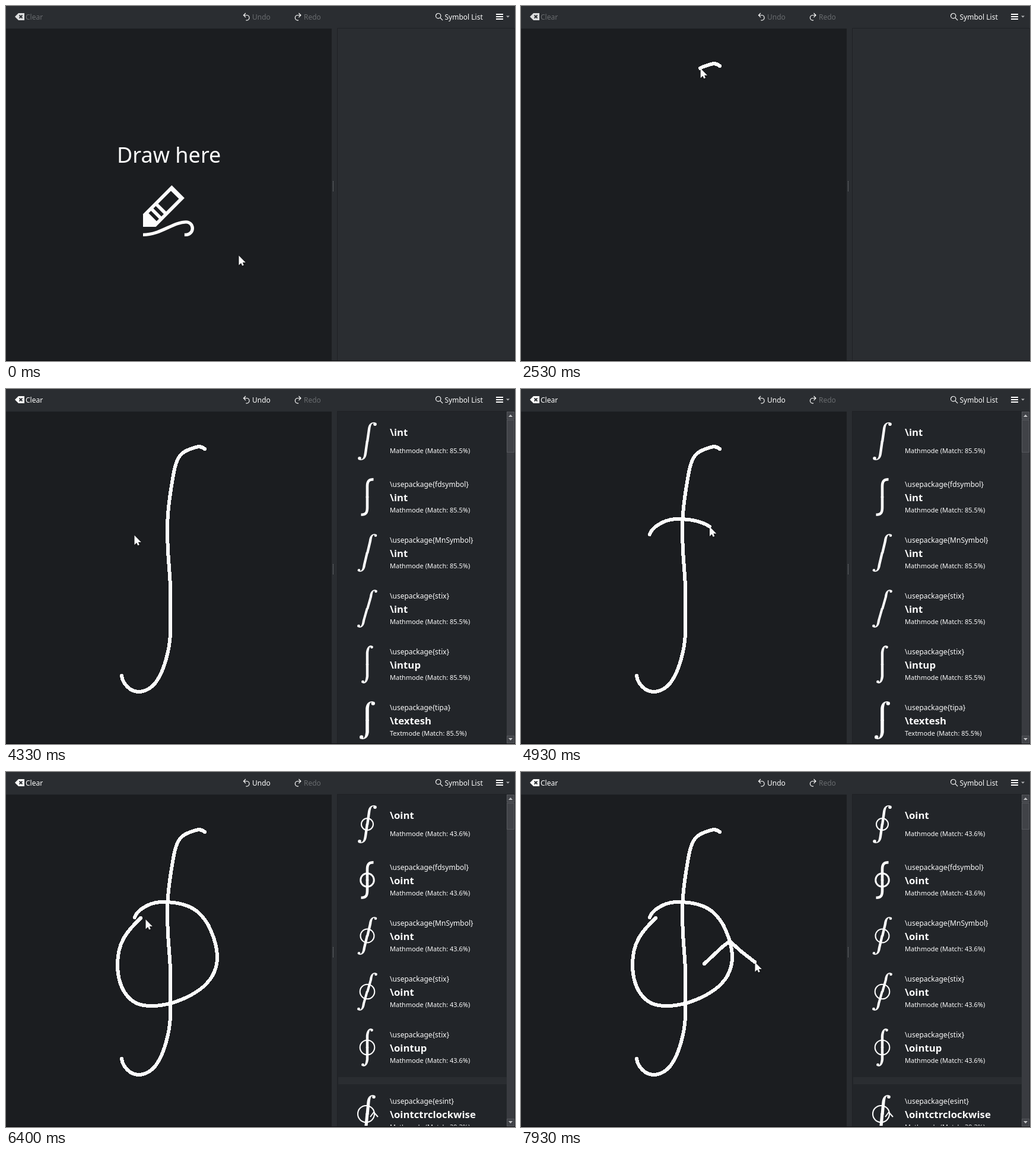
An HTML page for the animation above (8 s loop, 858 by 598 pixels).

```html
<!DOCTYPE html>
<html lang="en">
<head>
<meta charset="utf-8">
<title>Symbol drawing</title>
<style>
  html, body { margin: 0; width: 100%; height: 100%; overflow: hidden; background: #2a2d31; }
  svg { display: block; width: 858px; height: 598px; font: 12px "Noto Sans", sans-serif; fill: #fcfcfc; }
  .line { fill: none; stroke: #fcfcfc; }
  .ink { stroke-width: 6; stroke-linecap: round; stroke-linejoin: round; shape-rendering: crispEdges; }
  .cmd { font-size: 16.8px; font-weight: 700; }
  .match { font-size: 11px; }
  .dim { fill: #686b6e; }
</style>
</head>
<body>
<svg viewBox="0 0 858 598">
  <defs><clipPath id="view"><rect x="559" y="38" width="285" height="558"/></clipPath></defs>
  <rect width="858" height="598" fill="#2a2d31"/>
  <rect y="38" width="549" height="560" fill="#1b1d20"/>
  <path d="M558.5 598V37.5H857.5V598" fill="none" stroke="#1f2125"/>
  <path d="M551.5 295V312" fill="none" stroke="#8a8c8f" stroke-dasharray="1 1"/>

  <path id="clearIcon" d="M15 18L21 12H31V24H21Z"/>
  <path d="M22.5 15.5l5 5m0-5l-5 5" stroke="#2a2d31" stroke-width="1.8"/>
  <text id="clear" x="33" y="23">Clear</text>
  <path id="undoIcon" class="line" stroke-width="1.2" d="M404 12l-3.5 3.5 3.5 3.5M400.5 15.5h5.3a4.3 4.3 0 0 1 0 8.6h-1.3"/>
  <text id="undo" x="415" y="23">Undo</text>
  <use href="#undoIcon" transform="translate(897.5) scale(-1 1)"/>
  <text class="dim" x="502" y="23">Redo</text>
  <g class="line" stroke-width="1.2"><circle cx="728.7" cy="16.7" r="4.2"/><path d="M731.7 19.7l4.5 4.5"/></g>
  <text x="739.5" y="23">Symbol List</text>
  <path d="M826 13h12v2h-12zm0 4h12v2h-12zm0 4h12v2h-12z"/>
  <path d="M843 16.5h6l-3 3z" fill="#b0b2b4"/>

  <g id="hint">
    <text x="274.7" y="264" font-size="36" text-anchor="middle">Draw here</text>
    <g transform="translate(231 302) scale(5.375)">
      <path d="M9 0L13 4 4 13H0V9Z"/>
      <path id="slots" fill="#1b1d20"/>
      <path class="line" d="M0 15.5C5.5 15.5 9.5 11.5 13.5 11.5A2 2 0 0 1 13.5 15.5H13"/>
    </g>
  </g>

  <g id="list">
    <rect x="559" y="38" width="285" height="559" fill="#222529"/>
    <g id="plain" clip-path="url(#view)"></g>
    <g id="ring" clip-path="url(#view)"></g>
    <rect x="844" y="38" width="13" height="559" fill="#393b40"/>
    <g fill="#414348" stroke="#56585d">
      <rect x="844.5" y="38.5" width="12" height="12"/>
      <rect x="844.5" y="584.5" width="12" height="12"/>
      <rect id="thumb" x="844.5" y="52.5" width="12"/>
    </g>
    <path d="M847 47h7l-3.5-4zM847 588h7l-3.5 4z" fill="#c4c5c7"/>
  </g>
  <rect y="597" width="858" height="1" fill="#0c0c0e"/>

  <path id="stem" class="line ink" d="M335 101C328 95 322 97 311 101C296 106 288 113 283 140
    C277 172 272 205 272 235C272 290 277 305 277 340V413C276 435 268 475 251 496C238 511 222 513 210 506C202 501 196 492 195 483"/>
  <path id="loop" class="line ink" d="M217 245C220 234 240 219 264 219C310 219 328 235 341 258C350 276 356 296 356 312
    C356 350 325 374 283 388C263 394 245 394.5 236 393.5C203 391 188 358 188 325C188 288 202 270 227 246"/>
  <path id="head" class="line ink" d="M309 323L340 294 352 285 372 303 394 320"/>
  <path id="cursor" d="M.5 .5V16.5L4.2 13 6.2 17.5 8.8 16.4 6.9 12H11.8Z" style="filter:drop-shadow(0 1px 1.5px rgba(0,0,0,.6))"/>
</svg>
<script>
const $ = id => document.getElementById(id);
const LOOP = 8000, RATE = 15;

// Dark slots across the pencil: start and end measured down its length.
$('slots').setAttribute('d', [[1, 5], [5.75, 6.5], [7.25, 8]].map(([a, b]) => {
  const corner = (p, d) => `${9 - d + p} ${d + p}`;
  return `M${corner(.75, a)}L${corner(3.25, a)}L${corner(3.25, b)}L${corner(.75, b)}Z`;
}).join(''));

// One half of an integral sign; the other half is the same turned by 180 degrees.
const ball = (lean, w, x, r) =>
  `<path d="M${-w} 1L${lean - w} -20C${lean - w + 1} -28 ${lean + 2} -32 ${x - 1} -32L${x} -30.6
   C${lean + 4} -31 ${lean + w + 1} -27 ${lean + w} -20L${w} 1Z"/><circle cx="${x}" cy="${r - 31.6}" r="${r}"/>`;
const hook = '<path class="line" stroke-width="4.6" d="M0 1V-18C0 -27 3 -29.7 10.5 -29.7"/>';
const circle = (r, w = 2.1, x = 0) => `<circle class="line" cx="${x}" r="${r}" stroke-width="${w}"/>`;

const styles = [
  { pack: '', half: ball(3, 2.2, 13, 2.8), ring: circle(10) },
  { pack: 'fdsymbol', half: hook, ring: circle(11.3, 3) },
  { pack: 'MnSymbol', half: ball(5, 2.2, 14, 2.3), ring: circle(11.5) },
  { pack: 'stix', half: ball(6, 2.1, 14.5, 2.4), ring: circle(12.3) },
  { pack: 'stix', half: ball(0, 2.2, 7.5, 2.4), ring: circle(12.3) }
];
const esh = { pack: 'tipa', half: ball(0, 2.8, 9.8, 3.2), name: 'textesh', note: 'Textmode (Match: 85.5%)' };
const turn = {
  pack: 'esint', half: ball(2, 2.6, 11, 2.8), name: 'ointctrclockwise', note: 'Mathmode (Match: 39.3%)', gap: 18,
  ring: circle(14, 2.1, -2) + '<path class="line" stroke-width="2" d="M5 5l6 -8 7 8"/>'
};

function row({ pack, half, ring, name, note, gap = 0 }, i) {
  const [packY, nameY, noteY] = pack ? [-17, 7, 26] : [0, -9, 20];
  return `<g transform="translate(609 ${88 + 94 * i + gap})">
    ${half}<g transform="rotate(180)">${half}</g>${ring || ''}
    ${pack && `<text x="38" y="${packY}">\\usepackage{${pack}}</text>`}
    <text class="cmd" x="38" y="${nameY}">\\${name}</text>
    <text class="match" x="38" y="${noteY}">${note}</text></g>`;
}

function rows(base, score, last) {
  const main = styles.map((s, i) => ({
    ...s, ring: last.ring && s.ring,
    name: base + (i === 4 ? 'up' : ''), note: `Mathmode (Match: ${score}%)`
  }));
  return [...main, last].map(row).join('');
}
$('plain').innerHTML = rows('int', '85.5', esh);
$('ring').innerHTML = '<rect x="560" y="514" width="284" height="12" fill="#2a2d31"/>' + rows('oint', '43.6', turn);

// Keys: time and the share of the stroke drawn by then.
const strokes = [
  { el: $('stem'), keys: [[2133, 0], [2533, .068], [3000, .59], [3400, .836], [3667, 1]] },
  { el: $('loop'), keys: [[4400, 0], [4733, .08], [5533, .578], [6133, 1]] },
  { el: $('head'), keys: [[6933, 0], [7933, 1]] }
];
for (const s of strokes) s.length = s.el.getTotalLength();

// Free pointer moves: start, end, from, to.
const moves = [
  [1133, 1933, [392, 420], [335, 101]],
  [3667, 3867, [195, 483], [205, 440]],
  [3867, 4333, [205, 440], [216, 246]],
  [6133, 6400, [227, 246], [235, 248]],
  [6400, 6800, [235, 248], [309, 323]]
];

const mix = (a, b, k) => a + (b - a) * k;
const clamp = k => Math.max(0, Math.min(1, k));
const ease = k => k * k * (3 - 2 * k);

function along(keys, t) {
  let v = 0;
  for (let i = 1; i < keys.length; i++) {
    const [t0, a] = keys[i - 1], [t1, b] = keys[i];
    if (t >= t0) v = mix(a, b, clamp((t - t0) / (t1 - t0)));
  }
  return v;
}

const show = (id, on) => $(id).style.display = on ? '' : 'none';

function draw(time) {
  const t = Math.floor((time + 4) * RATE / 1000) * 1000 / RATE;
  let [x, y] = moves[0][2], since = 0;
  for (const [t0, t1, a, b] of moves) {
    if (t < t0) continue;
    const k = ease(clamp((t - t0) / (t1 - t0)));
    [x, y] = [mix(a[0], b[0], k), mix(a[1], b[1], k)];
    since = t0;
  }
  for (const { el, keys, length } of strokes) {
    const start = keys[0][0], drawn = length * along(keys, t);
    el.style.visibility = drawn > .5 ? 'visible' : 'hidden';
    el.style.strokeDasharray = `${drawn} ${length + 10}`;
    if (t > start && start > since) ({ x, y } = el.getPointAtLength(drawn));
  }
  $('cursor').setAttribute('transform', `translate(${x} ${y})`);

  const found = t >= 3730, ringed = t >= 6260;
  show('hint', t < 2190);
  show('list', found);
  show('plain', !ringed);
  show('ring', ringed);
  $('thumb').setAttribute('height', ringed ? 44 : 54);
  for (const id of ['clear', 'undo']) $(id).setAttribute('class', found ? '' : 'dim');
  $('clearIcon').setAttribute('fill', found ? '#fcfcfc' : '#dcddde');
}

const begin = performance.now();
function tick() {
  draw((performance.now() - begin) % LOOP);
  requestAnimationFrame(tick);
}
tick();
</script>
</body>
</html>
```
